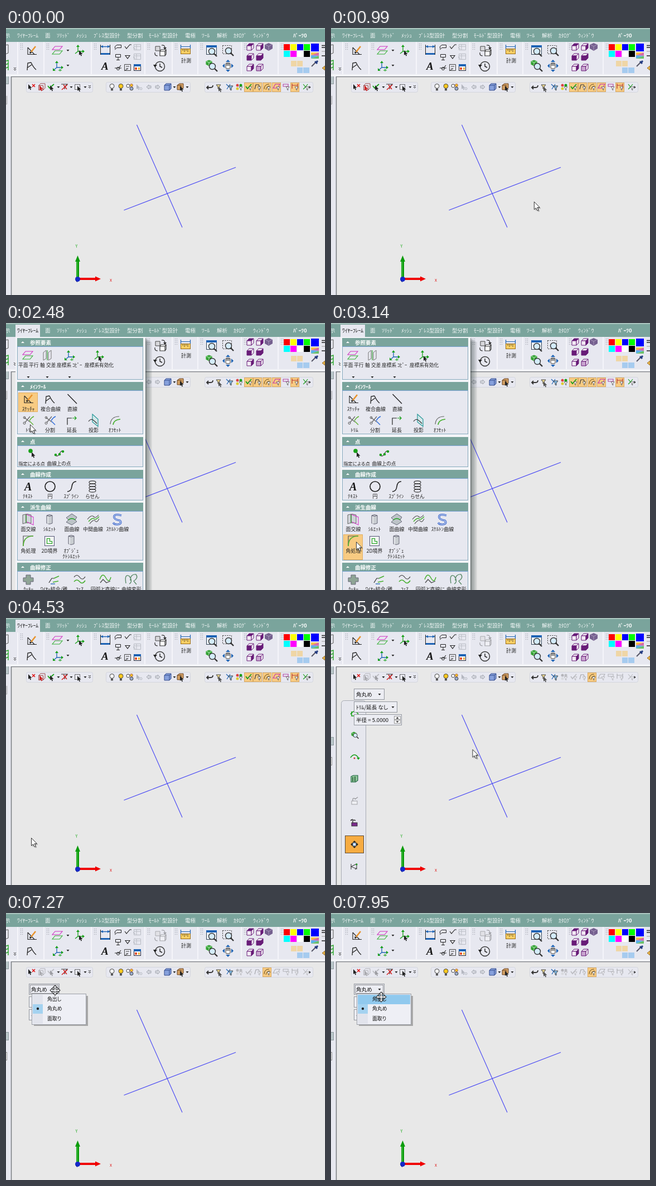
An HTML page for the animation above (8000 ms loop, 572 by 480 pixels).

```html
<!DOCTYPE html>
<html lang="ja">
<head>
<meta charset="utf-8">
<style>
html, body { margin: 0; width: 100%; height: 100%; overflow: hidden; background: #e8e8e8; }
svg { display: block; width: 572px; height: 480px; }
text { font-family: "Noto Sans CJK JP", "Noto Sans CJK", sans-serif; white-space: pre; }
.a { font-family: "Liberation Serif", serif; font-style: italic; font-weight: bold; }
.palt { font-feature-settings: "palt"; }
.off { filter: grayscale(1); opacity: .38; }
</style>
</head>
<body>
<svg id="stage" viewBox="0 0 572 480" xmlns="http://www.w3.org/2000/svg"></svg>
<script>
const TEAL = '#7aa49c', PALE = '#e7e8f0', INK = '#222', GREEN = '#18a018', BLUE = '#1c62b4',
  PURPLE = '#681c78', ORANGE = '#f8cb82';

const line = (d, c = INK, w = 1, f = 'none') => `<path d="${d}" stroke="${c}" stroke-width="${w}" fill="${f}"/>`;
const fill = (d, f = INK) => `<path d="${d}" fill="${f}"/>`;
const box = (x, y, w, h, f, s = 'none', r = 0) =>
  `<rect x="${x}" y="${y}" width="${w}" height="${h}" rx="${r}" fill="${f}" stroke="${s}"/>`;
const dot = (x, y, r, f = INK, s = 'none', w = 1) =>
  `<circle cx="${x}" cy="${y}" r="${r}" fill="${f}" stroke="${s}" stroke-width="${w}"/>`;
const text = (x, y, s, size = 9, f = INK, more = '') =>
  `<text x="${x}" y="${y}" font-size="${size}" fill="${f}" ${more}>${s}</text>`;
const mid = (x, y, s, size = 9) => text(x, y, s, size, INK, 'text-anchor="middle" class="palt"');
const at = (x, y, body, k = 1) => `<g transform="translate(${x} ${y}) scale(${k})">${body}</g>`;
const group = (id, body) => `<g id="${id}">${body}</g>`;
const drop = (x, y) => fill(`M${x - 2.5} ${y - 1}h5l-2.5 3z`);
const more = (x, y) => line(`M${x - 2} ${y - 3}l2 2l2 -2m-4 3l2 2l2 -2`);

// Icons, each centred on 0,0
const ARROW = 'M0 0V14L3.2 11L5.4 16L7.8 15L5.6 10.2H10Z';
const pointer = (c = INK) => at(-5, -5, fill(ARROW, c), .65);
const sketch = line('M-8 -6V6.500H8M-8 -6L4 6.500M-4 1V3.500H-1', INK, 1.1) + line('M6 -8L-2 2', '#e8932c', 2.6) + line('M-2 2L-4 5', INK, 1.4);
const polyline = line('M-8 8L-7 -5L-1 -6M-7 3L0 -2M-1 -6Q3 3 8 7', INK, 1.3);
const planes = line('M-4 -7H9L4 -1H-9Z', '#d030c0', 1.1) + line('M-4 1H9L4 7H-9Z', '#38b038', 1.1);
const axes = line('M-2 2V-7M-2 2H8M-2 2L-8 7', BLUE, 1.3) + fill('M-5 -6L-2 -10L1 -6ZM6 -1L10 2L6 5ZM-9 3V8H-4Z', GREEN) +
  line('M1 7H7M4 4V9', GREEN);
const axesPick = line('M-3 2V-7M-3 2H7M-3 2L-8 6', GREEN, 1.3) + fill('M-6 -6L-3 -10L0 -6ZM5 -1L9 2L5 5Z', GREEN) + at(4, 5, pointer());
const lens = dot(0, 0, 5.5, '#d4ecfa', '#333', 1.4) + line('M4 4L9 9', '#333', 2.4);
const cube = (a = '#f2eaf4', b = '#f2eaf4', c = '#f2eaf4') => line('M-6 -2L-2 -6H6L2 -2Z', PURPLE, 1, a) +
  line('M-6 -2H2V6H-6Z', PURPLE, 1, b) + line('M2 -2L6 -6V2L2 6Z', PURPLE, 1, c);
const solid = (c, d) => fill('M0 -7L7 -4V3L0 7L-7 3V-4Z', c) + line('M-6 -4L0 -1L6 -4M0 -1V6', d);
const funnel = (c = '#fff') => line('M-4 -3H4L1 1V5L-1 4V1Z', '#444', 1, c);
const bulb = c => dot(0, -1.5, 4, c, '#444') + box(-2, 3, 4, 3.5, '#555');
const scissors = c => line('M-7 -5L3 3M-6 4L3 -7', '#666', 1.2) + dot(-7, 5, 2, 'none', '#555') + dot(-7, -5, 1.8, 'none', '#555') + line('M2 1Q5 -5 10 -7M3 2L9 8', c, 1.4);
const cylinder = line('M-5 -7V7Q0 10 5 7V-7Q0 -10 -5 -7Q0 -4 5 -7', '#667', 1, '#c9cdd1') + line('M-3 -5V8', '#f0f2f4', 1.5);
const sheets = line('M-7 -5L-2 -9V6L-7 9ZM2 -5L7 -9V6L2 9Z', '#777', 1) + line('M0 -9V9', GREEN);
const turn = line('M-7 2Q0 -8 7 2', GREEN, 1.6) + fill('M4 2H10L7 6Z', GREEN);
const moveAll = fill('M0 -8L4 -4H-4ZM0 8L4 4H-4ZM-8 0L-4 -4V4ZM8 0L4 -4V4Z') + box(-3, -3, 6, 6, '#fff', BLUE);
const cubePair = at(-3, -4, line('M-5 -4H3V4H-5Z', '#444', 1, '#d8d8dc')) + at(4, 4, line('M-4 -3H5V5H-4ZM-4 -3L-2 -6H7L5 -3M5 5L7 2V-6', '#333', 1.2, '#fff')) +
  line('M3 -10Q9 -11 9 -5M-9 3Q-10 9 -4 9', '#333', 1.2) + fill('M6 -6H12L9 -2Z');
const pan = fill('M-10 0L-6 -4V4ZM10 0L6 -4V4ZM0 -11L4 -7H-4ZM0 11L4 7H-4Z', BLUE) + box(-4, -5, 8, 10, '#fff', '#333', 2) + line('M-2 -5V0M0 -5V0M2 -5V0', '#333');

function menuBar() {
  const tabs = [[-2, '示'], [70, '面'], [91, 'ｿﾘｯﾄﾞ'], [126, 'ﾒｯｼｭ'], [157, 'ﾌﾟﾚｽ型設計'], [217, '型分割'], [256, 'ﾓｰﾙﾄﾞ型設計'],
    [321, '電極'], [351, 'ﾂｰﾙ'], [378, '解析'], [408, 'ｶﾀﾛｸﾞ'], [443, 'ｳｨﾝﾄﾞｳ']];
  return box(0, 0, 572, 25, TEAL) + box(0, 0, 572, 2, '#a9c4be') + tabs.map(([x, s]) => text(x, 17, s, 9.5, '#f4f8f8')).join('') +
    text(515, 17, 'ﾊﾟｰﾂ0', 9.5, '#fff', 'font-weight="bold"') +
    group('tabOn', box(17, 3, 44, 23, PALE) + text(20, 17, 'ﾜｲﾔｰﾌﾚｰﾑ', 9.5, '#111')) +
    group('tabOff', text(20, 17, 'ﾜｲﾔｰﾌﾚｰﾑ', 9.5, '#f4f8f8'));
}

function ribbon() {
  let s = box(0, 25, 572, 58, PALE) + box(0, 83, 572, 4, '#f3f4f8');
  for (const x of [22, 69, 154, 250, 299, 345, 423, 489])
    s += box(x - 2, 25, 2, 58, '#f5f5fa') + `<path d="M${x + 4.5} 28V39M${x + 7.5} 28V39" stroke="#9a9da8" stroke-width="1.200" stroke-dasharray="1.200 2.100"/>`;
  s += line('M-4 31L4 30V45L-4 48', '#555') + line('M-4 61L4 58V64L-4 67M-4 67L4 64V70L-4 74M-4 74L4 70V76', GREEN, 1.3) + more(16, 74);
  s += at(47, 41, sketch) + at(46, 68, polyline) + at(92, 40, planes) + at(93, 69, axes) + drop(111, 40) + drop(111, 67) + at(132, 40, axesPick);
  s += line('M169.500 30V48M186.500 30V48') + line('M170 33.500H186', BLUE, 1.5) + fill('M170 33L174 31V36ZM186 33L182 31V36Z', BLUE) +
    box(170, 45, 16, 3, BLUE) + text(171, 75, 'A', 19, '#111', 'class="a"');
  s += line('M195.500 37V33L199 30.500H206.500V35.500H199L195 39M196.500 47.500H205.500V52.500H196.500ZM201 53V57M198 57.500H204');
  s += line('M213 33L216 37L222 30H225M214 49.500H222L218 55Z', INK, 1.1);
  s += line('M195 72H202L206 67M202 72H207', INK, 1.1) + dot(201, 73, 2.5, 'none', INK) + line('M212.500 65.500H223.500V76.500H212.500ZM215 69H221M215 73H219L212 77', '#444');
  for (const y of [34, 51]) s += at(235, y, line('M-5.500 -4.500H6.500V5.500H-5.500ZM-5 -1H6M-1 -4V5', '#b9bcc4') + line('M-7 1L-3 4', '#b0b3bb'));
  s += box(229.5, 65.5, 12, 11, '#fff', '#223') + box(229, 65, 13, 4, BLUE) + box(231, 71, 4, 4, '#e05030') + box(237, 71, 3, 4, '#f0b040');
  s += group('section', at(276, 41, cubePair)) + dot(276, 69, 8.5, 'none', '#333', 1.4) + line('M276 64V69L280 71', INK, 1.4) + fill('M264 66H271L267 71Z');
  s += box(313.5, 37.5, 17, 9, '#f8d064', '#9a6c18') + line('M317 38V41M320 38V43M323 38V41M326 38V43', '#653') + line('M314 33.500H330M313.500 30V37M330.500 30V37', BLUE, 1.2) +
    text(314, 62, '計測', 9);
  s += box(359.5, 31.5, 18, 16, '#eef4fb', '#345') + box(359, 31, 19, 4, BLUE) + at(369, 42, lens);
  s += `<rect x="388.500" y="31.500" width="16" height="15" fill="none" stroke="#333" stroke-dasharray="2 2"/>` + at(399, 41, lens);
  s += at(364, 63, solid('#36a336', '#dfd'), .8) + at(370, 69, lens) + at(398, 68, pan);
  const P = PURPLE;
  s += [[438, 34, P], [455, 34, undefined, undefined, P], [438, 52, undefined, P], [455, 52, '#fff', P, P], [438, 71, undefined, undefined, P], [455, 71, undefined, '#c9a6d0']]
    .map(([x, y, a, b, c]) => at(x, y, cube(a, b, c))).join('') + at(471, 34, solid('#75608f', '#a998bb'));
  ['#f00', '#ff0', '#00f', '#0f0', '#0ff', '#f0f', '#fff', '#000'].forEach((c, i) =>
    s += box(498 + i % 4 * 12, i < 4 ? 29 : 41, 11, 11, c));
  s += box(547, 28, 14, 14, '#00f') + fill('M547 44H561L547 49Z', '#f6c040') + fill('M561 44V50L547 49Z', '#d96aa8') + fill('M547 49L561 50L547 55Z', '#58b0e8') + fill('M561 50V55H547Z', '#68c068');
  s += box(511, 59, 10, 10, '#efd6a6') + box(522, 59, 10, 10, '#efd6a6') + box(522, 71, 10, 10, '#a6cbef') + box(533, 71, 11, 10, '#a6cbef');
  s += line('M548 69L555 62', '#556', 2) + line('M554 60L558 64M556 62L559 59', '#223a80', 3);
  s += line('M566 31.500H572M566 35H572M566 50H572', INK, 1.4) + line('M566 42H572', '#999') + line('M567 72L572 68V76Z', '#946a20', 1, '#efbc50');
  return s;
}

const floatBar = (x, w) => box(x + .5, 97.5, w, 18, PALE, '#d3d5dd', 3);

function bars() {
  let s = floatBar(36, 119) + floatBar(179, 151) + floatBar(356, 194);
  s += at(45, 106, pointer() + line('M2 -5L7 0M7 -5L2 0', '#e01818', 1.6));
  s += group('pickBox', at(64, 106, line('M-5.500 -2.500H2.500V5.500H-5.500ZM-5.500 -2.500L-2 -6H6V2L2.500 5.500', '#944') + at(1, 2, pointer('#c22'))));
  s += group('pickCheck', at(81, 106, line('M-6 -2L-3 2L5 -5', GREEN, 1.8) + at(3, 2, pointer()))) + drop(94, 106);
  s += at(105, 106, line('M-6 -5H5L0 0V4', '#333', 1.2) + line('M-5 5L5 -4M-2 -4L4 4', '#d42020', 1.5)) + drop(117, 106);
  s += `<rect x="123.500" y="101.500" width="9" height="9" fill="none" stroke="#333" stroke-dasharray="2 1"/>` + at(133, 109, pointer()) + drop(142, 106) + more(150, 106);
  s += at(190, 106, bulb('#f4f4f4')) + at(206, 106, bulb('#ffc81e')) + at(222, 106, dot(-3, -2, 3, '#fff', '#444') + dot(3, -3, 2.5, '#ffc81e', '#a66') + dot(3, 3, 3, '#9ac', '#444'));
  s += at(239, 106, pointer('#b4b7c0') + dot(3, 3, 2, 'none', '#b4b7c0'));
  const back = line('M-4 0L0 -4V-2H4V2H0V4Z', '#a3a7b0', 1, '#d6d8df');
  s += at(256, 106, back) + at(272, 106, back, '-1 1');
  s += at(290, 106, line('M-6 -3L-3 -6H6V3L3 6H-6Z', '#334a8a', 1, '#86a0dc') + line('M-6 -3H3V6M3 -3L6 -6', '#334a8a')) + drop(302, 106);
  s += at(313, 106, line('M-6 -3L-2 -6H5V2L2 5H-6Z', '#6a4320', 1, '#d2a064') + line('M-6 -3H1V5', '#6a4320') + at(4, 3, pointer())) + drop(325, 106);
  s += line('M360 107H367Q371 107 371 103M363 104L360 107L363 110', '#333', 1.8);
  s += at(381, 105, funnel('#f4dc90') + at(5, 5, pointer('#555'))) + at(400, 106, line('M-5 -5L0 0M2 -5L-4 4', BLUE, 1.2) + at(3, 1, funnel('#80c0f0')));
  const filters = [
    [418, dot(-3, -3, 2.5, '#d44') + dot(3, -3, 2.5, GREEN) + dot(-3, 3, 2.5, '#dc3')],
    [435, line('M-5 -1L-2 3L5 -5', GREEN, 1.8), 1],
    [451, line('M-5 4L-3 -4L2 -4L5 3', '#333', 1.1), 1],
    [468, line('M-5 4Q-5 -5 4 -5M-2 5Q-1 -1 5 -2', '#7a5a20', 1.1), 1],
    [485, line('M-2 -5H6L2 2H-6Z', '#c030b0', 1.1), 1],
    [502, line('M-5 -5H4V-1H-5Z', '#b040a0', 1.1)],
    [518, line('M-5 -6V3M5 -6V3M-5 -3H5', '#b03030', 1.1), 1],
    [537, line('M-4 -5L0 0L4 -5M0 0L-4 4', GREEN, 1.1)]];
  const rest = filters.filter(f => f[0] !== 468);
  const cell = ([x]) => box(x - 7.5, 98.5, 15, 16, ORANGE, '#d8a860');
  const icon = ([x, g]) => at(x, 106, g + at(3, 2, funnel(), .75));
  s += group('hot', rest.filter(f => f[2]).map(cell).join('')) + cell(filters[3]);
  return s + group('filters', rest.map(icon).join('')) + icon(filters[3]) + fill('M543.500 104V109L546.500 106.500Z');
}

function view() {
  return box(0, 87, 572, 393, '#e8e8e8') + box(0, 87, 9, 393, PALE) + line('M572 87.500H9.500V480', '#777b80', 1.5) +
    box(-1.5, 86.5, 6, 14, '#bcc8cc', '#8c989c') +
    group('leftA', line('M1.500 122V137H0', '#999')) + group('leftB', box(-1.5, 214.5, 6, 14, '#bcc8cc', '#8c989c') + box(-2.5, 250.5, 4, 14, '#fff', '#888')) +
    line('M234.500 174L316 358.500M211.500 327.500L412 250.500', '#4444f4', 1.1) +
    box(126, 419, 5, 29, '#0b9c0b') + box(127, 419, 1, 29, '#5ccc5c') + fill('M128.500 409L133 420H124Z', '#0b9c0b') +
    box(131, 449, 30, 4, '#f00000') + fill('M170 451L160 446.500V455.500Z', '#f00000') + dot(128.5, 451.5, 4.5, '#1428c8') + line('M125 454L128 457', '#111a80') +
    text(124.5, 395, 'Y', 7, '#22aa22') + text(186, 456, 'x', 8, '#e02020');
}

function menu() {
  let s = '';
  for (let i = 1; i < 9; i++) s += box(20, 26 + i, 230 + i * 1.5, 460, 'rgba(30,50,46,.065)');
  s += box(17, 25, 233, 460, '#f3f4f8') + box(250, 27, 1.5, 460, 'rgba(40,50,50,.35)');
  const parts = [['参照要素', 27, 102], ['ﾒｲﾝﾂｰﾙ', 106, 200], ['点', 205, 259], ['曲線作成', 264, 319], ['派生曲線', 323, 427], ['曲線修正', 431, 490]];
  for (const [name, y, end] of parts)
    s += box(20.5, y + .5, 225, end - y - 1, PALE, '#86aabd') + box(20, y, 226, 15, TEAL) + box(20, y + 15, 226, 1, '#79a2d4') +
      fill(`M27 ${y + 9}H33L30 ${y + 6}Z`, '#fff') + text(43, y + 12, name, 9.5, '#fff', 'font-weight="bold"');
  s += '<rect id="cell" x="22.500" width="34" fill="#f8cb82" stroke="#e2ae62"/>';
  s += at(39, 58, planes) + at(74, 58, sheets) + at(114, 59, axes) + at(167, 59, axesPick) + [40, 74, 114].map(x => drop(x, 97)).join('');
  s += [[22, '平面'], [41, '平行'], [61, '軸'], [72, '交差'], [91, '座標系'], [119, 'ｺﾋﾟｰ'], [141, '座標系有効化']].map(([x, v]) => text(x, 79, v, 8.7)).join('');
  s += at(41, 137, sketch) + at(79, 137, polyline) + line('M110.500 128L127 145', INK, 1.4);
  s += at(40, 175, scissors('#5cb030')) + at(79, 175, scissors('#2868d8'));
  s += at(118, 175, line('M-8 8V-4H0', INK, 1.2) + line('M1 -4H8M5 -7L8 -4L5 -1', GREEN, 1.2));
  s += at(157, 175, line('M-2 -11L8 -2V11L-2 3Z', '#289898', 1.2, '#d5e8ea') + line('M-9 2Q-5 -4 0 0T6 6', '#333', 1.2));
  s += at(196, 175, line('M-9 7Q-8 -7 7 -7', '#666', 1.2) + line('M-4 8Q-3 -1 9 -2', '#48b030', 1.6));
  s += at(45, 231, dot(-1, -1, 3.8, GREEN) + at(6, 6, pointer())) + at(95, 234, line('M-8 3Q-2 8 1 1T8 -3', '#333', 1.1) + dot(-6, 3, 2.3, GREEN) + dot(1, 2, 2.3, GREEN) + dot(7, -3, 2.3, GREEN));
  s += text(33, 301, 'A', 20, '#111', 'class="a"') + dot(79, 294, 9, 'none', INK, 1.7) + line('M110 303Q117 303 118 294T126 285', INK, 1.6);
  for (let i = 0; i < 4; i++) s += `<ellipse cx="155" cy="${286.5 + i * 5}" rx="6" ry="2.600" fill="none" stroke="#333" stroke-width="1.100"/>`;
  s += at(40, 353, line('M-10 -8Q-2 -11 5 -8V7Q-4 5 -10 8Z', '#666', 1, '#cfd4d8') + line('M-4 -9L9 -4V10L-4 4Z', '#d438c8', 1.1) + line('M-4 -9V6', GREEN, 1.3)) + at(78, 353, cylinder);
  s += at(117, 353, line('M-9 -3L1 -10L10 -4L7 1L10 4L1 10L-9 5L-5 1Z', '#667', 1, '#bcc3c7') + line('M-5 1Q1 -4 7 1', GREEN, 1.6));
  s += at(156, 353, line('M-10 0Q-3 -9 1 -5T10 -8M-6 8Q1 -1 4 3T11 -1', '#555', 1.1) + line('M-8 4Q-1 -4 2 -1T11 -5', '#48b030', 1.4));
  const bend = 'M7 -7Q-8 -11 -6 -3Q-4 1 4 2Q9 7 1 9Q-5 10 -8 6';
  s += at(200, 353, line(bend, '#2a58c8', 3.2) + line(bend, '#dce6f4', 1.2));
  s += at(40, 392, line('M-9 9V-9H9', '#555', 1.2) + line('M-9 9Q-9 -9 9 -9', '#52b030', 1.7));
  s += at(78, 392, box(-8.5, -8.5, 17, 17, '#f2f5f2', '#557') + line('M-4.500 4.500V-4.500H0.500V0.500H4.500V4.500Z', GREEN, 1.1)) + at(117, 390, cylinder);
  s += at(40, 461, line('M-9 -3H-4V-8H4V-3H9V4H4V9H-4V4H-9Z', '#667', 1, '#8fa596'));
  s += at(86, 461, line('M-9 6L-4 -2H0', '#333', 1.2) + line('M0 -2L9 -6M-2 5L8 3', '#48b030', 1.6) + line('M-6 8H2', BLUE, 1.3));
  s += at(132, 461, line('M-10 -4Q-5 -11 0 -4T10 -5', '#444', 1.2) + line('M-10 4Q-5 -2 0 4T10 2', '#48b030', 1.5));
  s += at(178, 461, line('M-10 0Q-5 -14 1 -3T10 -4', '#48b030', 1.5) + line('M-9 6L-4 0L2 6L9 3', '#444', 1.2));
  s += at(225, 461, line('M-10 7Q-13 -11 -4 -6Q3 4 -4 8M-2 2Q-2 -10 8 -9Q13 -3 4 3L9 9', '#5a8a68', 1.4));
  const labels = [[40, 158, 'ｽｹｯﾁｬ'], [80, 158, '複合曲線'], [119, 158, '直線'], [42, 196, 'ﾄﾘﾑ'], [79, 196, '分割'], [118, 196, '延長'], [157, 196, '投影'], [195, 196, 'ｵﾌｾｯﾄ'],
    [46, 256, '指定による点', 8.4], [95, 256, '曲線上の点', 8.7], [39, 315, 'ﾃｷｽﾄ'], [79, 315, '円'], [117, 315, 'ｽﾌﾟﾗｲﾝ'], [155, 315, 'らせん'],
    [40, 374, '面交線'], [78, 374, 'ｼﾙｴｯﾄ'], [118, 374, '面曲線'], [156, 374, '中間曲線'], [200, 374, 'ｽｹﾙﾄﾝ曲線'],
    [40, 413, '角処理'], [78, 413, '2D境界'], [117, 413, 'ｵﾌﾞｼﾞｪ'], [117, 423, 'ｸﾄｼﾙｴｯﾄ'],
    [40, 482, 'ｸｯｷｰ'], [86, 482, 'ﾜｲﾔｰ結合/離'], [132, 482, 'ﾌｪｱ'], [178, 482, '円弧と直線に'], [225, 482, '曲線変形']];
  return s + labels.map(l => mid(...l)).join('');
}

function panel() {
  let s = box(18.5, 148.5, 44, 345, '#e6e7ee', '#a8acb4', 5);
  const lock = c => box(-5, 0, 10, 6, c, '#333') + line('M-3 0V-3Q-3 -6 2 -4', '#333', 1.4);
  const icons = [[171, turn + line('M-5 -3V5H3', GREEN, 1.5)], [210, at(-1, -1, solid('#36a336', '#dfd') + at(4, 3, lens), .65)],
    [249, turn + dot(0, 3, 1.5, '#c33')], [289, line('M-6 -4L-2 -6H6V3L2 6H-6Z', '#264', 1.2, '#8fc79a') + line('M-3 -3V5M1 -4V5', '#253', 1.5)],
    [329, `<g class="off">${lock('#fff') + line('M1 -3L6 -7', INK, 1.5)}</g>`], [368, lock('#7a2a8c') + line('M-7 -4L-3 -6', INK, 1.5)],
    [447, line('M-6 -5V5M-6 0L4 -5V4ZM4 0A5 5 0 0 1 1 5', '#444', 1.1) + dot(4, -4, 1.5, GREEN)]];
  s += icons.map(([y, g]) => at(42, y, g)).join('');
  return s + group('hover', box(25.5, 391.5, 33, 31, '#f7ac42', '#5a4a38')) + at(42, 407, moveAll, .85);
}

function dialog() {
  const field = (y, w, label) => box(41.5, y + .5, w, 19, '#ecedf3', '#94989f') + text(45, y + 13.5, label, 9.6, '#111', 'class="palt"');
  return field(127, 54, '角丸め') + drop(87, 137) + field(150, 77, 'ﾄﾘﾑ/延長 なし') + drop(111, 160) + field(173, 85, '半径 = 5.0000') +
    box(113.5, 176.5, 11, 6, '#f6f6f8', '#999') + box(113.5, 183.5, 11, 6, '#f6f6f8', '#999') + fill('M116.500 181H121.500L119 178ZM116.500 185.500H121.500L119 188Z');
}

function list() {
  return `<rect x="43.500" y="129.500" width="50" height="15" fill="none" stroke="#333" stroke-dasharray="1 1"/>` +
    box(50, 149, 97, 54, 'rgba(0,0,0,.28)') + box(46.5, 145.5, 97, 55, '#eeeff5', '#9a9ea6') + box(48, 147, 18, 52, '#e2e4ec') +
    group('row', box(48, 147, 94, 17, '#90c9ee')) + box(48, 164, 18, 17, '#a4d2f0') + dot(57, 172, 2.2) +
    ['角出し', '角丸め', '面取り'].map((v, i) => text(74, 158 + i * 17.3, v, 8.9, '#111', 'class="palt"')).join('');
}

function cursors() {
  const cross = 'M0 -9L4 -5H1.500V-1.500H5V-4L9 0L5 4V1.500H1.500V5H4L0 9L-4 5H-1.500V1.500H-5V4L-9 0L-5 -4V-1.500H-1.500V-5H-4Z';
  return group('arrow', at(2, 2, fill(ARROW, 'rgba(0,0,0,.28)')) + line(ARROW, '#333', 1, '#fff')) +
    group('plus', line('M0 -6V7M-6 0H7', '#85888c', 4) + line('M-1.500 -7V6M-8 -.5H6', '#444', 1.2)) +
    group('move', line(cross, '#333', 1.1, '#f2f4f8'));
}

const stage = document.getElementById('stage');
stage.innerHTML = view() + ribbon() + menuBar() + bars() + group('panel', panel()) + group('dialog', dialog()) +
  group('list', list()) + group('menu', menu()) + group('cursor', cursors());
const el = id => document.getElementById(id);
const show = (id, on) => el(id).setAttribute('opacity', +on);
const dim = (id, on) => el(id).setAttribute('class', on ? 'off' : '');
const ramp = (t, a, b) => Math.min(1, Math.max(0, (t - a) / (b - a)));

const sine = u => .5 - .5 * Math.cos(Math.PI * u);
const out = u => 1 - (1 - u) ** 1.9;
// Pointer path: arrival time, x, y, easing
const path = [[690, 513, 452], [1470, 55, 22, sine], [1590, 50.5, 17, out], [1750, 50.5, 17, sine], [1940, 42, 27, sine], [2240, 42, 27, sine],
  [3200, 45.5, 395.5, out], [5080, 45.5, 395.5, sine], [5850, 307, 196, sine], [5960, 307, 196, sine], [6680, 128, 160, sine], [6740, 124, 153, sine],
  [6770, 124, 153, sine], [7200, 88, 139, sine], [7300, 88, 139, sine], [7490, 88, 157, sine], [7620, 88, 157, sine], [7950, 90, 151, sine]];

function pointerAt(t) {
  const i = path.findIndex(k => k[0] > t);
  if (i === 0) return path[0].slice(1, 3);
  if (i < 0) return path[path.length - 1].slice(1, 3);
  const a = path[i - 1], b = path[i], u = b[3]((t - a[0]) / (b[0] - a[0]));
  return [a[1] + (b[1] - a[1]) * u, a[2] + (b[2] - a[2]) * u];
}

const cells = [[44, 101], [125, 160], [163, 199], [221, 258], [281, 318], [340, 378], [380, 426]];

function draw(t) {
  const [x, y] = pointerAt(t), cmd = t >= 4630;
  el('cursor').setAttribute('transform', `translate(${x.toFixed(2)} ${y.toFixed(2)})`);
  show('cursor', t >= 690);
  show('arrow', t < 6640);
  show('plus', t >= 6640 && t < 6770);
  show('move', t >= 6770);

  const tab = t >= 1530 && !cmd;
  show('tabOn', tab);
  show('tabOff', !tab);
  show('menu', t < 4530 ? ramp(t, 1720, 1940) : 0);
  const hoverY = pointerAt(t - 60)[1], cell = cells.find(c => hoverY >= c[0] && hoverY <= c[1]);
  show('cell', Boolean(cell) && t > 2240);
  if (cell) {
    el('cell').setAttribute('y', cell[0] + .5);
    el('cell').setAttribute('height', cell[1] - cell[0] - 1);
  }

  for (const id of ['section', 'pickBox', 'pickCheck', 'filters']) dim(id, cmd);
  show('hot', !cmd);
  show('leftA', !cmd);
  show('leftB', cmd);
  show('dialog', t >= 4820);
  show('panel', ramp(t, 5080, 5260) - .7 * ramp(t, 5960, 6260) - .3 * ramp(t, 7100, 7250));
  show('hover', t < 5960);
  show('list', t >= 7260);
  show('row', t >= 7650);
}

const start = performance.now();
function tick() {
  draw((performance.now() - start) % 8000);
  requestAnimationFrame(tick);
}
tick();
</script>
</body>
</html>
```
